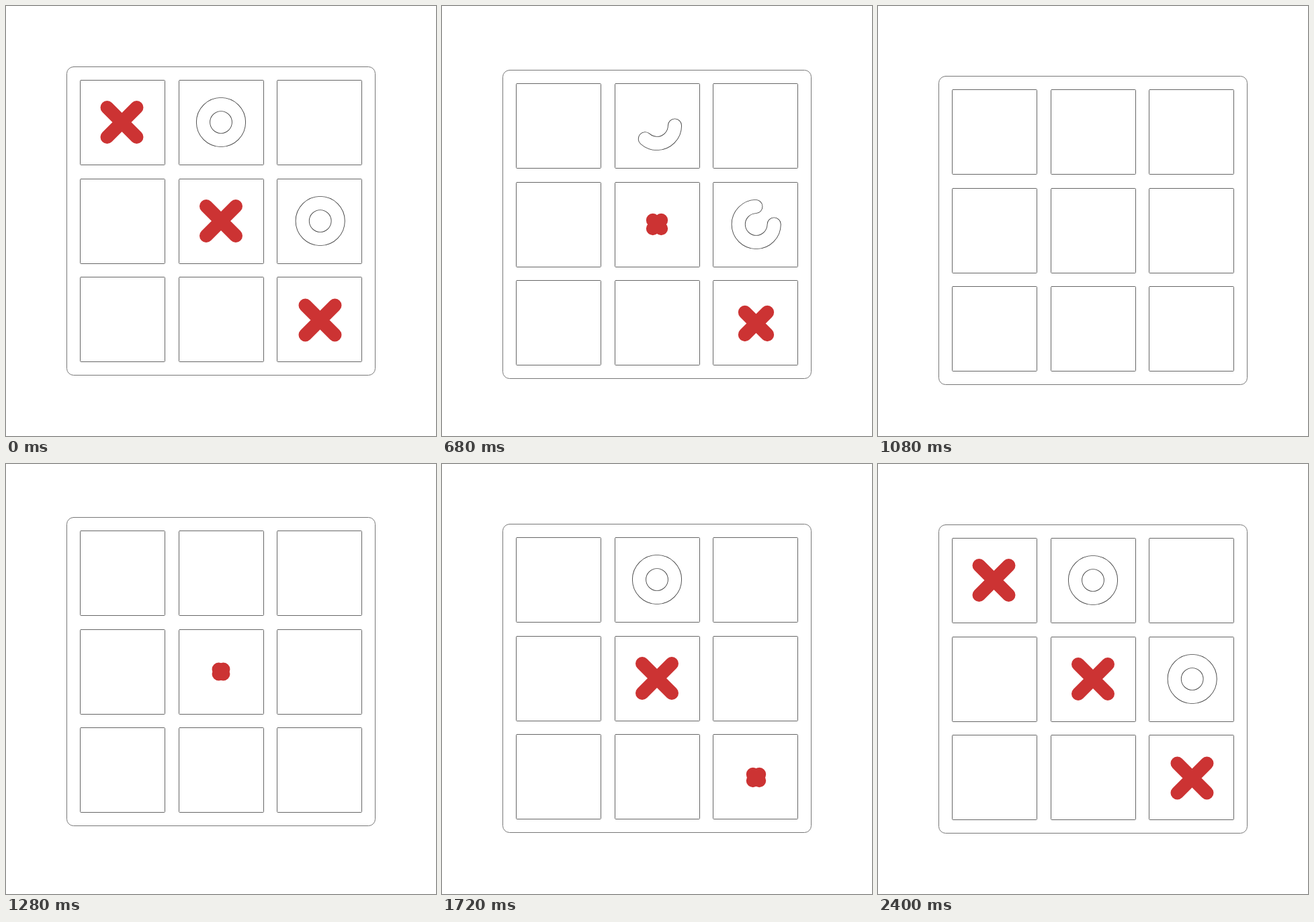
These frames come from a looping animation (640x640 px, 2800 ms). An HTML page with a canvas:

```html
<!DOCTYPE html>
<html>
<head>
<meta charset="utf-8">
<style>
html, body { margin: 0; width: 100%; height: 100%; overflow: hidden; background: #fff; }
canvas { display: block; }
</style>
</head>
<body>
<canvas id="stage" width="640" height="640"></canvas>
<script>
const ctx = document.getElementById('stage').getContext('2d');
const STEP = 40, LOOP = 2800, FADE = 10;

// Times are in steps of 40 ms: when each mark starts to shrink and to grow.
const crosses = [
  { x: 172.5, y: 173, out: 5, back: 50 },
  { x: 320, y: 320, out: 10.5, back: 29.5 },
  { x: 467.5, y: 467.5, out: 13.8, back: 40 }
];
const rings = [
  { x: 320, y: 173, out: 11.1, back: 33 },
  { x: 467.7, y: 320, out: 13.7, back: 42.9 }
];

function ease(t, from, to) {
  const u = Math.min(1, Math.max(0, (t - from) / (to - from)));
  return u * u * (3 - 2 * u);
}

const amount = (m, t) =>
  1 - ease(t, m.out, m.out + FADE) + ease(t, m.back, m.back + FADE);

const boardShift = t => Math.round(
  19 * ease(t, 15, 20.8) - 32 * ease(t, 24.9, 33.4) + 13 * ease(t, 33.4, 44.5));

function outline(x, y, size, radius, color) {
  ctx.beginPath();
  ctx.roundRect(x + .5, y + .5, size, size, radius);
  ctx.lineWidth = 1;
  ctx.strokeStyle = color;
  ctx.stroke();
}

function drawBoard() {
  outline(90, 90, 459, 10, '#777');
  for (const y of [110, 257, 403])
    for (const x of [110, 257, 403]) outline(x, y, 126, 1, '#666');
}

function drawCross({ x, y }, k) {
  const r = 22 * k;
  ctx.beginPath();
  ctx.moveTo(x - r, y - r);
  ctx.lineTo(x + r, y + r);
  ctx.moveTo(x + r, y - r);
  ctx.lineTo(x - r, y + r);
  ctx.lineWidth = 20;
  ctx.strokeStyle = '#c33';
  ctx.stroke();
}

// A white band over a slightly wider dark one leaves a thin contour.
function drawRing({ x, y }, k) {
  ctx.beginPath();
  ctx.arc(x, y, 26.5, 0, 2 * Math.PI * k);
  for (const [width, color] of [[21.1, '#444'], [19.3, '#fff']]) {
    ctx.lineWidth = width;
    ctx.strokeStyle = color;
    ctx.stroke();
  }
}

function drawMarks(marks, draw, t) {
  for (const m of marks) {
    const k = amount(m, t);
    if (k > .001) draw(m, k);
  }
}

function render(now) {
  const t = Math.floor(now % LOOP / STEP);
  ctx.setTransform(1, 0, 0, 1, 0, 0);
  ctx.fillStyle = '#fff';
  ctx.fillRect(0, 0, 640, 640);
  ctx.translate(0, boardShift(t));
  ctx.lineCap = 'round';
  drawBoard();
  drawMarks(rings, drawRing, t);
  drawMarks(crosses, drawCross, t);
}

const start = performance.now();
function tick() {
  render(performance.now() - start);
  requestAnimationFrame(tick);
}
tick();
</script>
</body>
</html>
```
